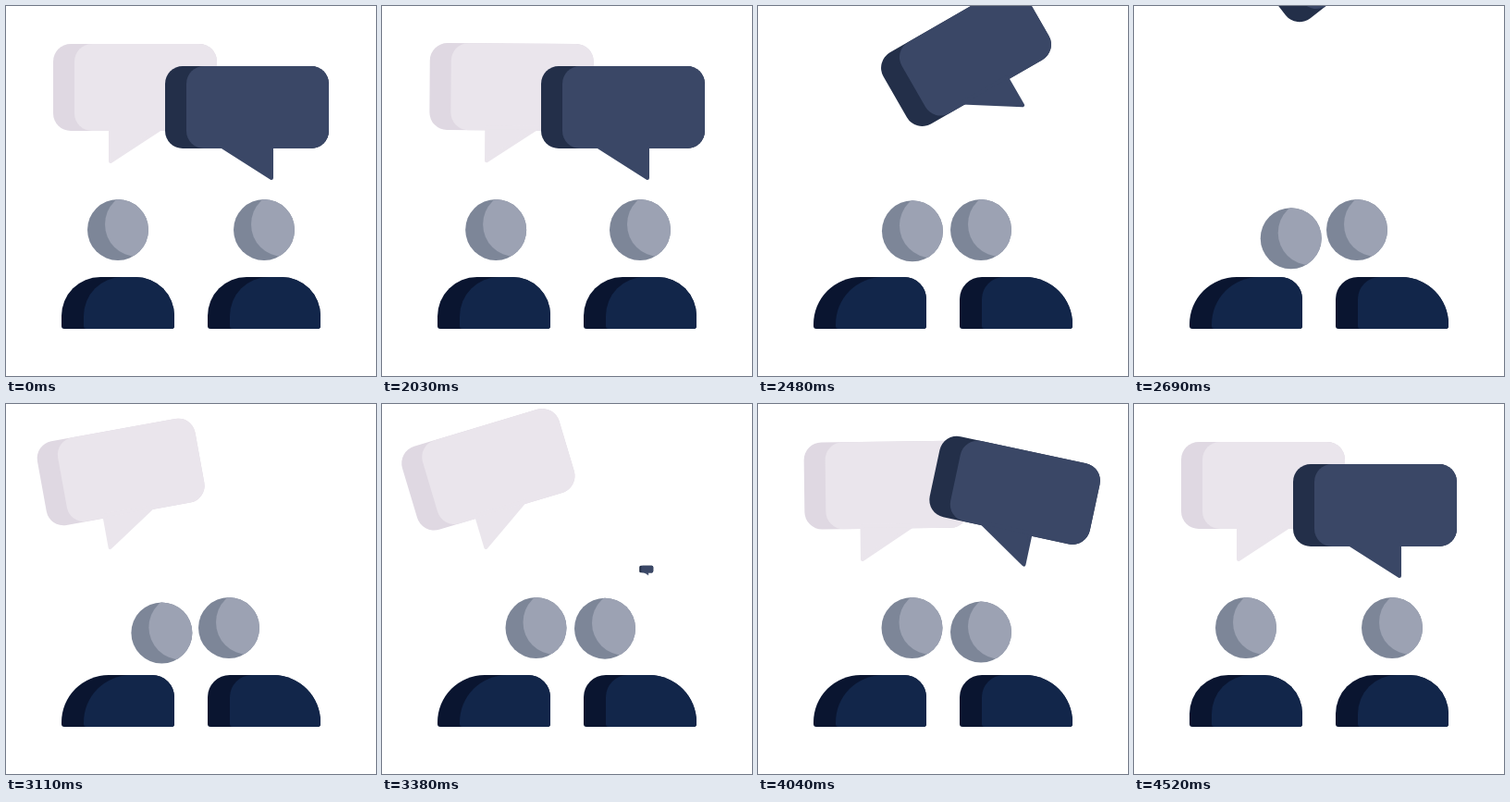
Write an HTML page with a canvas that moves like this. It is 400 px wide and 400 px high and loops after 4550 ms.

```html
<!DOCTYPE html>
<html lang="en">
<head>
<meta charset="utf-8">
<title>Conversation</title>
<style>
  html, body { margin: 0; width: 100%; height: 100%; overflow: hidden; background: #fff; }
  canvas { display: block; width: 400px; height: 400px; }
</style>
</head>
<body>
<canvas width="400" height="400"></canvas>
<script>
const ctx = document.querySelector('canvas').getContext('2d');
const LOOP = 4550, REST = 2030;

// Times in ms: fly out from `leave`, pop up again at `back`, lie still at `rest`.
const bubbles = [
  { x: 51, y: 41, h: 94, tipX: 112, tipY: 170, side: 1, shade: '#dfd8e2', fill: '#eae5ec',
    leave: 2010, back: 2800, rest: 4140, hop: 13 },
  { x: 172, y: 65, h: 89, tipX: 288, tipY: 188, side: -1, shade: '#232f49', fill: '#3a4766',
    leave: 2235, back: 3320, rest: 4380, hop: 32 }
];

const people = [
  { x: 60, side: 1, shift: 45.5, lean: 1985, nod: 2440, depth: 12, drift: 0.35 },
  { x: 218, side: -1, shift: 38, lean: 2030, nod: 3355, depth: 14, drift: 0 }
];

// Smooth 0 to 1 ramp.
function ease(t, start, duration) {
  const u = Math.min(1, Math.max(0, (t - start) / duration));
  return u * u * (3 - 2 * u);
}

function panel(x, y, w, h, radii, color) {
  ctx.fillStyle = color;
  ctx.beginPath();
  ctx.roundRect(x, y, w, h, radii);
  ctx.fill();
}

function disc(x, y, r, color) {
  ctx.fillStyle = color;
  ctx.beginPath();
  ctx.arc(x, y, r, 0, 7);
  ctx.fill();
}

function bubblePose(b, t) {
  if (t < b.back) {
    return {
      angle: 38 * b.side * ease(t, b.leave, 350),
      lift: 315 * ease(t, b.leave, 750),
      scale: 1
    };
  }
  const peak = b.back + 540, settle = b.rest - peak;
  return {
    angle: -16.8 * b.side * (ease(t, b.back, 540) - ease(t, peak, settle)),
    lift: b.hop * (ease(t, b.back, 340) - ease(t, peak, settle * 0.6)),
    scale: ease(t, b.back, 340)
  };
}

function drawBubble(b, t) {
  const { angle, lift, scale } = bubblePose(b, t);
  ctx.save();
  ctx.translate(b.tipX, b.tipY - lift);
  ctx.rotate(angle * Math.PI / 180);
  ctx.scale(scale, scale);
  ctx.translate(-b.tipX, -b.tipY);
  panel(b.x, b.y, 177, b.h, 19, b.shade);
  panel(b.x + 23, b.y, 154, b.h, 19, b.fill);

  // The tail's corners are rounded by its outline.
  const edge = b.tipX + b.side, base = b.y + b.h - 3;
  ctx.beginPath();
  ctx.moveTo(edge, base);
  ctx.lineTo(edge, b.tipY - 2);
  ctx.lineTo(edge + 55 * b.side, base);
  ctx.closePath();
  ctx.strokeStyle = b.fill;
  ctx.lineWidth = 4;
  ctx.lineJoin = 'round';
  ctx.fill();
  ctx.stroke();
  ctx.restore();
}

function drawHead(x, y) {
  disc(x, y, 33, '#7d8698');
  ctx.save();
  ctx.clip();
  disc(x + 21, y - 6, 35, '#9ca2b3');
  ctx.restore();
}

function drawPerson(p, t) {
  const lean = duration => p.side * (ease(t, p.lean, duration) - ease(t, 4070, 400));
  const shoulder = tilt => 42 + (tilt > 0 ? 9 : 18) * tilt;
  const radii = [shoulder(lean(300)), shoulder(-lean(300)), 3, 3];
  panel(p.x, 293, 122, 56, radii, '#0a1530');
  panel(p.x + 24, 293, 98, 56, radii, '#12264a');

  const phase = (t - p.nod) / 380;
  const dip = phase > 0 && phase < 2 ? p.depth * Math.sin(Math.PI * phase) ** 2 : 0;
  drawHead(p.x + 61 + p.shift * lean(350) + p.drift * dip, 242 + dip);
}

function frame() {
  const now = performance.now() % LOOP;
  const t = now < REST ? 0 : now;
  ctx.fillStyle = '#fff';
  ctx.fillRect(0, 0, 400, 400);
  bubbles.forEach(b => drawBubble(b, t));
  people.forEach(p => drawPerson(p, t));
  requestAnimationFrame(frame);
}
frame();
</script>
</body>
</html>
```
